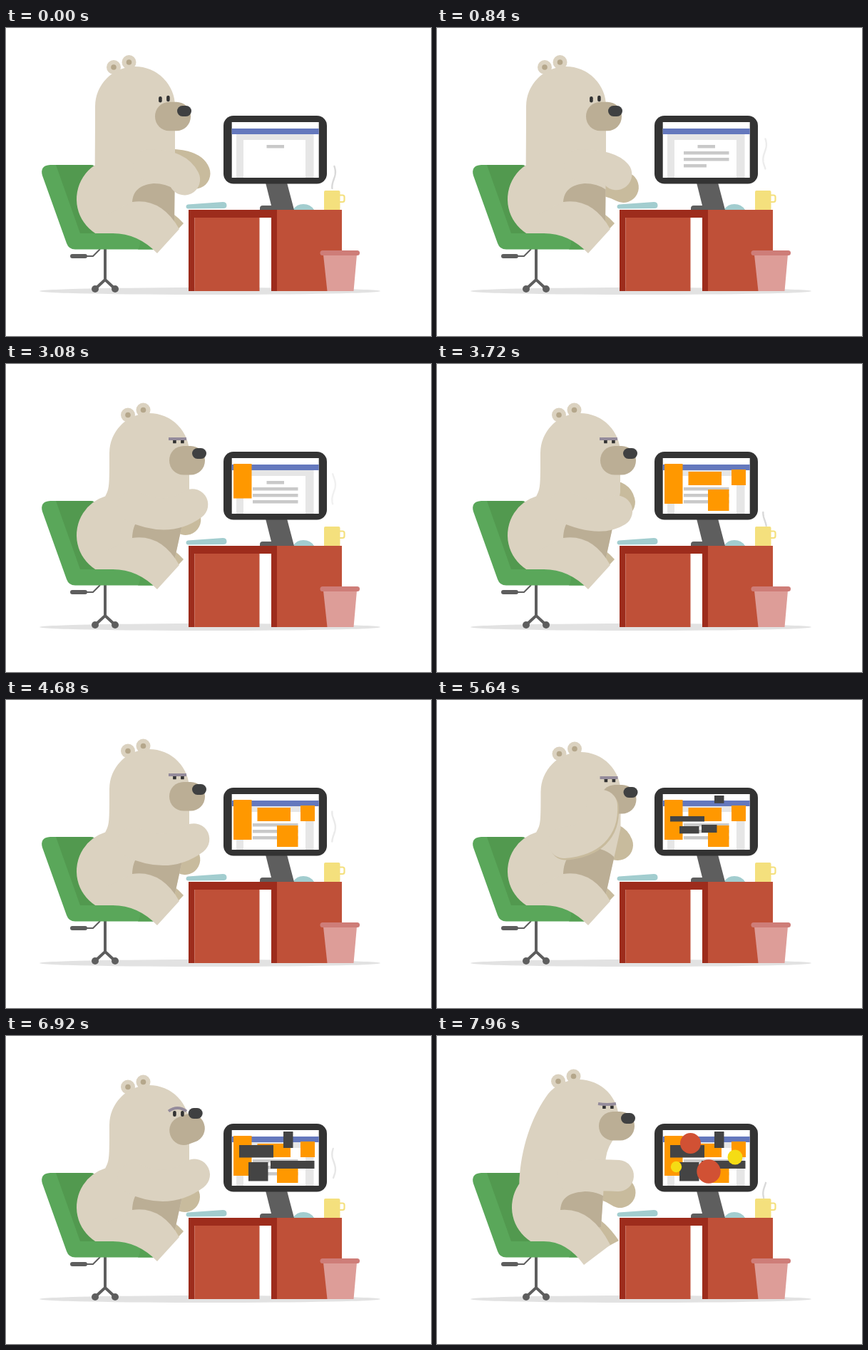
An HTML page with a canvas that plays this animation: 596 px wide and 432 px high, repeating every 8 s.

```html
<!DOCTYPE html>
<html lang="en">
<head>
<meta charset="utf-8">
<title>Bear at a desk</title>
<style>
html, body { margin: 0; width: 100%; height: 100%; overflow: hidden; background: #fff; }
canvas { display: block; width: 596px; height: 432px; }
</style>
</head>
<body>
<canvas id="stage"></canvas>
<script>
const LOOP = 8000;
const canvas = document.getElementById('stage');
const ratio = window.devicePixelRatio || 1;
canvas.width = Math.round(596 * ratio);
canvas.height = Math.round(432 * ratio);
const c = canvas.getContext('2d');

const FUR = '#dbd2c0', SHADE = '#bbae95', FAR = '#c8bb9d', GREY = '#5e5e5e';
const GREEN = '#5aa75a', RED = '#bf5038', DARK_RED = '#9d2c1c', TEAL = '#a2cdcf';
const ORANGE = '#ff9800', INK = '#444', BRICK = '#d15134', YELLOW = '#f5dc14';

const clamp = v => Math.max(0, Math.min(1, v));
const progress = (t, start, length) => clamp((t - start) / length);
const smooth = p => p * p * (3 - 2 * p);
const ramp = (t, start, end) => smooth(progress(t, start, end - start));

function box(color, x0, y0, x1, y1, r = 0) {
  c.fillStyle = color;
  c.beginPath();
  c.roundRect(x0, y0, x1 - x0, y1 - y0, r);
  c.fill();
}

function dot(color, x, y, rx, ry = rx) {
  c.fillStyle = color;
  c.beginPath();
  c.ellipse(x, y, rx, ry, 0, 0, Math.PI * 2);
  c.fill();
}

function shape(color, d) {
  c.fillStyle = color;
  c.fill(new Path2D(d));
}

function line(color, width, d, cap = 'butt') {
  c.strokeStyle = color;
  c.lineWidth = width;
  c.lineCap = cap;
  c.lineJoin = 'round';
  c.stroke(new Path2D(d));
}

function drawChair() {
  dot('#e2e2e2', 286, 369, 239, 5);
  line(GREY, 4, 'M139 308V353M125 366L139 353L153 366');
  dot(GREY, 125, 366, 5);
  dot(GREY, 153, 366, 5);
  line(GREY, 2, 'M112 320H122L132 310');
  box(GREY, 90, 317, 114, 323, 3);
  shape(GREEN, 'M62 192H118Q126 192 129 200L155 288H208Q219 288 219 299Q219 310.5 208 310.5H97Q88 310.5 85 302L51 207Q47 193 62 192Z');
  shape('#52994f', 'M70 192H118Q126 192 129 200L155 288H104Z');
  shape('#55a053', 'M183 288H208Q219 288 219 299Q219 310.5 208 310.5H185Q192 300 183 288Z');
}

function drawDesk() {
  box(DARK_RED, 256, 255, 380, 266);
  box(DARK_RED, 256, 255, 264.5, 369);
  box(RED, 264.5, 266, 355.5, 369);
  box(DARK_RED, 372, 255, 380, 369);
  box(RED, 380, 255, 471, 369);
  shape('#dd9d98', 'M445 318H492L487.5 369H450.5Z');
  box('#ce7d78', 440.5, 312, 496, 319, 3.5);
  shape(TEAL, 'M403 255Q407 247 417 247Q427 247 432 255Z');
  shape(GREY, 'M364 217H394L404 255H356V253Q356 249 360 249H372Z');
  line('#f4e07d', 2.2, 'M467 234.5H472Q474.5 234.5 474.5 237V241.5Q474.5 244 472 244H467');
  box('#f4e07d', 446, 228, 468.5, 255, [2, 2, 0, 0]);
}

function drawKeyboard() {
  shape(TEAL, 'M255 247.5L304 244Q309.5 244 309.5 249Q309.5 253 305 253L256 253.5Q252.5 253.5 252.5 250.5Q252.5 248 255 247.5Z');
}

// Grows a block from its top, bottom or left edge
function grow(color, x, y, w, h, edge, p) {
  if (p <= 0) return;
  if (edge === 'left') w *= p;
  if (edge === 'bottom') y += h * (1 - p);
  if (edge !== 'left') h *= p;
  box(color, x, y, x + w, y + h);
}

const ads = [
  [319, 140, 25.5, 56, 'top'], [352.5, 151, 46.5, 19, 'left'],
  [413, 148, 20, 22, 'top'], [380, 176, 29.5, 30, 'top']
];
const bars = [
  [389, 134, 13.5, 23, 'top'], [327, 153, 48, 17.5, 'bottom'],
  [340, 177, 27.5, 26.5, 'top'], [371, 175, 61.5, 11, 'left']
];
const discs = [
  [BRICK, 355.5, 150.5, 14.5], [BRICK, 381, 190, 16.7],
  [YELLOW, 418, 170, 10.5], [YELLOW, 335.5, 183.5, 7.7]
];

function drawMonitor(t) {
  box('#333', 305, 123, 450, 218.5, 14);
  box('#fff', 316.7, 132, 438.7, 210);
  box('#e6e6e6', 323, 149, 431.5, 210);
  box('#fff', 333, 157, 420, 210);
  box('#6478bd', 316.7, 141, 438.7, 149);
  box('#c9c9c9', 365.5, 164, 390, 168.5);
  for (let i = 0; i < 3; i++) {
    grow('#c9c9c9', 346, 173 + 9 * i, 63.5, 4.5, 'left', progress(t, 40 + 320 * i, 320));
  }
  ads.forEach((ad, i) => grow(ORANGE, ...ad, progress(t, 2960 + 150 * i, 140)));
  bars.forEach((bar, i) => grow(INK, ...bar, progress(t, 5500 + 12 * i, 300)));
  discs.forEach(([color, x, y, r], i) => {
    dot(color, x, y, r * ramp(t, 6940 + 40 * i, 7040 + 40 * i));
  });
}

const plumeStarts = [-390, 1771, 3504, 5807, 7720];

function drawSteam(t) {
  plumeStarts.forEach((start, i) => {
    const age = t - start;
    if (age <= 0 || age >= 1600) return;
    const rise = 75 * (1 - (1 - clamp(age / 1500)) ** 2);
    const length = Math.min(rise - 1, 22 + .28 * rise);
    if (length < 1) return;
    c.globalAlpha = 1 - progress(age, 850, 750);
    c.strokeStyle = '#d9d9d9';
    c.lineWidth = 2.4;
    c.lineCap = 'round';
    c.beginPath();
    for (let d = 0; d <= length; d++) {
      const bend = (d - 8 - 7 * i) * Math.PI / 21;
      c.lineTo(459.6 + 2.3 * Math.cos(bend), 228 - rise + d);
    }
    c.stroke();
    c.globalAlpha = 1;
  });
}

// How far the bear is into each action, from 0 to 1
function actions(t) {
  const lean = ramp(t, 2640, 3040);
  const rise = ramp(t, 7580, 7960);
  const kick = ramp(t, 2040, 2400) - ramp(t, 2560, 2840);
  const think = ramp(t, 5160, 5520) - ramp(t, 5920, 6280);
  const look = ramp(t, 6740, 6880) - ramp(t, 7580, 7840);
  const typing = 1 - ramp(t, 2200, 2400) + lean - ramp(t, 5040, 5400) + ramp(t, 6720, 6800) - rise;
  const beat = typing * Math.cos((Math.min(t, 7160) - 6920) * 2 * Math.PI / 378);
  return { lean, rise, kick, think, look, beat, calm: 1 - typing };
}

function headAt({ lean, think, rise }) {
  return {
    x: 181 + 20 * lean + .5 * think - 2 * rise,
    y: 110 + 15 * lean + 4 * think - 8 * rise,
    tilt: .6 * rise
  };
}

// Hip circle and head circle, joined by the back and the chest
function torsoPath(head, { lean, rise }) {
  const r = 56, hipR = 57, hipX = 156 + 6 * rise;
  const sin = Math.sin(head.tilt), cos = Math.cos(head.tilt);
  const backX = head.x - r * cos, backY = head.y - r * sin;
  const frontX = head.x + r * cos, frontY = head.y + r * sin;
  const joint = -2.15 + .28 * lean - .66 * rise;
  const jointX = hipX + hipR * Math.cos(joint), jointY = 240 + hipR * Math.sin(joint);
  const p = new Path2D();
  p.moveTo(156, 288);
  p.arc(hipX, 240, hipR, Math.PI - 1, 2 * Math.PI + joint);
  p.bezierCurveTo(jointX + 6 * lean - 5 * rise, jointY - 11 - 27 * rise,
    backX - 45 * sin, backY + 45 * cos, backX, backY);
  p.arc(head.x, head.y, r, Math.PI + head.tilt, 2 * Math.PI + head.tilt);
  p.quadraticCurveTo(frontX - 15 * sin, frontY + 15 * cos, head.x + r - 19 * rise, 180);
  p.lineTo(236 - 6 * rise, 276 - 8 * rise);
  p.closePath();
  return p;
}

function drawBelly(torso, knee, { lean, rise }) {
  const x = 207 + 6 * (lean - rise), y = 218 - 11 * (lean - rise);
  c.save();
  c.clip(torso);
  shape(SHADE, `M${knee.x} ${knee.y + 3}C${knee.x} ${knee.y - 16} ${188 - 5 * lean} ${y + 2} ${x} ${y}`
    + `Q${x + 24} ${y} ${x + 38} ${y + 16}L262 234V290H185Z`);
  c.restore();
}

function drawFarLeg({ rise }) {
  shape(FAR, `M196 284H207L219 306L${249 + 6 * rise} ${274 + 13 * rise}Q236 259 215 250Z`);
}

function drawNearLeg(knee, { kick, rise }) {
  const heel = `${212 + 12 * kick - 6 * rise} ${316 - 20 * kick + 5 * rise}`;
  const toe = `${243 + 15 * kick} ${282 - 16 * kick + 11 * rise}`;
  const under = `${185 + 21 * kick - 3 * rise} ${288 - 8 * kick}`;
  const thigh = `${218 + 7 * kick - 2 * rise} ${238 - 16 * kick + 2 * rise}`;
  shape(FUR, `M${150 + 28 * kick} 288Q${under} ${heel}L${toe}Q${thigh} ${knee.x} ${knee.y}L140 262Z`);
}

function drawFarArm({ lean, rise, calm, beat }) {
  const x = 264 - 10.5 * lean + 3.5 * rise + 3 * calm * (1 - lean) - 3 * beat;
  const y = 209.5 - calm * (15 - 9 * lean) + 16 * rise + 16 * beat;
  const drop = clamp((y - 194) / 32) ** 2;
  line(FAR, 43, `M215 ${188 + 28 * drop}Q${x - 4 - 18 * drop} ${y - 15 + 6 * drop} ${x} ${y}`, 'round');
}

function drawNearArm({ lean, think, rise, calm, beat }) {
  const x = 250.5 + 7.5 * lean - 27 * think - 4 * rise + (1 + 5 * lean) * beat;
  const y = 210.5 - 10 * lean - 52.5 * think - 4.5 * rise - 3 * calm * (1 - lean) - 6 * beat;
  const shoulder = `${200 - 22 * lean + 12 * rise} ${192 + 8 * lean - 3 * rise}`;
  const elbow = `${240 - 13 * lean + 7 * think} ${192 + 30 * lean - 27 * think - 28 * rise}`;
  const arm = `M${shoulder}Q${elbow} ${x} ${y}`;
  if (think > 0) {
    c.save();
    c.globalAlpha = think;
    c.translate(2, 2.5);
    line(FAR, 44, arm, 'round');
    c.restore();
  }
  line(FUR, 44, arm, 'round');
}

function drawFace(head, { lean, look, rise }, t) {
  c.save();
  c.translate(head.x, head.y);
  for (const [x, y] of [[-30, -55], [-8.5, -62]]) {
    dot(FUR, x + rise, y + 1.5 * lean, 10);
    dot('#b5a78b', x + rise, y + 1.5 * lean, 3.8);
  }

  c.save();
  c.translate(53, 14 - 3.7 * lean - 4.3 * look - rise);
  c.rotate(-.35 * look);
  box(SHADE, -25, -20.3, 25, 20.3, 20);
  c.restore();

  const noseX = 59 + lean - 5.3 * look - rise;
  const noseY = -1 - 6 * lean - 17 * look - 2 * rise;
  box('#3f4041', noseX, noseY, noseX + 20, noseY + 15, 7.5);

  const blink = Math.abs(t - 4600) < 60 ? .3 : 1;
  const half = (4.25 - 2 * lean + 1.75 * look) * blink;
  for (let i = 0; i < 2; i++) {
    const x = 35.4 + 11 * i;
    const y = -9.8 - 6.2 * lean - 1.3 * rise - 1.2 * i * (1 - lean);
    box('#333', x - 2.3, y - half, x + 2.3, y + half, Math.max(.5, half - 2));
  }

  const browY = -20 + .5 * look - 2 * rise;
  c.globalAlpha = lean;
  line('#948b9b', 4, `M27 ${browY}Q39.5 ${browY - 9 * look + 2 * rise} 52 ${browY}`);
  c.restore();
}

function drawBear(t) {
  const act = actions(t);
  const head = headAt(act);
  const torso = torsoPath(head, act);
  const knee = { x: 177 + act.kick - 4 * act.rise, y: 244 - 13 * act.kick };
  drawFarLeg(act);
  drawFarArm(act);
  c.fillStyle = FUR;
  c.fill(torso);
  drawBelly(torso, knee, act);
  drawNearLeg(knee, act);
  drawFace(head, act, t);
  drawNearArm(act);
}

function draw(t) {
  c.setTransform(ratio, 0, 0, ratio, 0, 0);
  c.fillStyle = '#fff';
  c.fillRect(0, 0, 596, 432);
  drawChair();
  drawDesk();
  drawBear(t);
  drawKeyboard();
  drawMonitor(t);
  drawSteam(t);
}

const begin = performance.now();
function tick() {
  draw((performance.now() - begin) % LOOP);
  requestAnimationFrame(tick);
}
tick();
</script>
</body>
</html>
```
